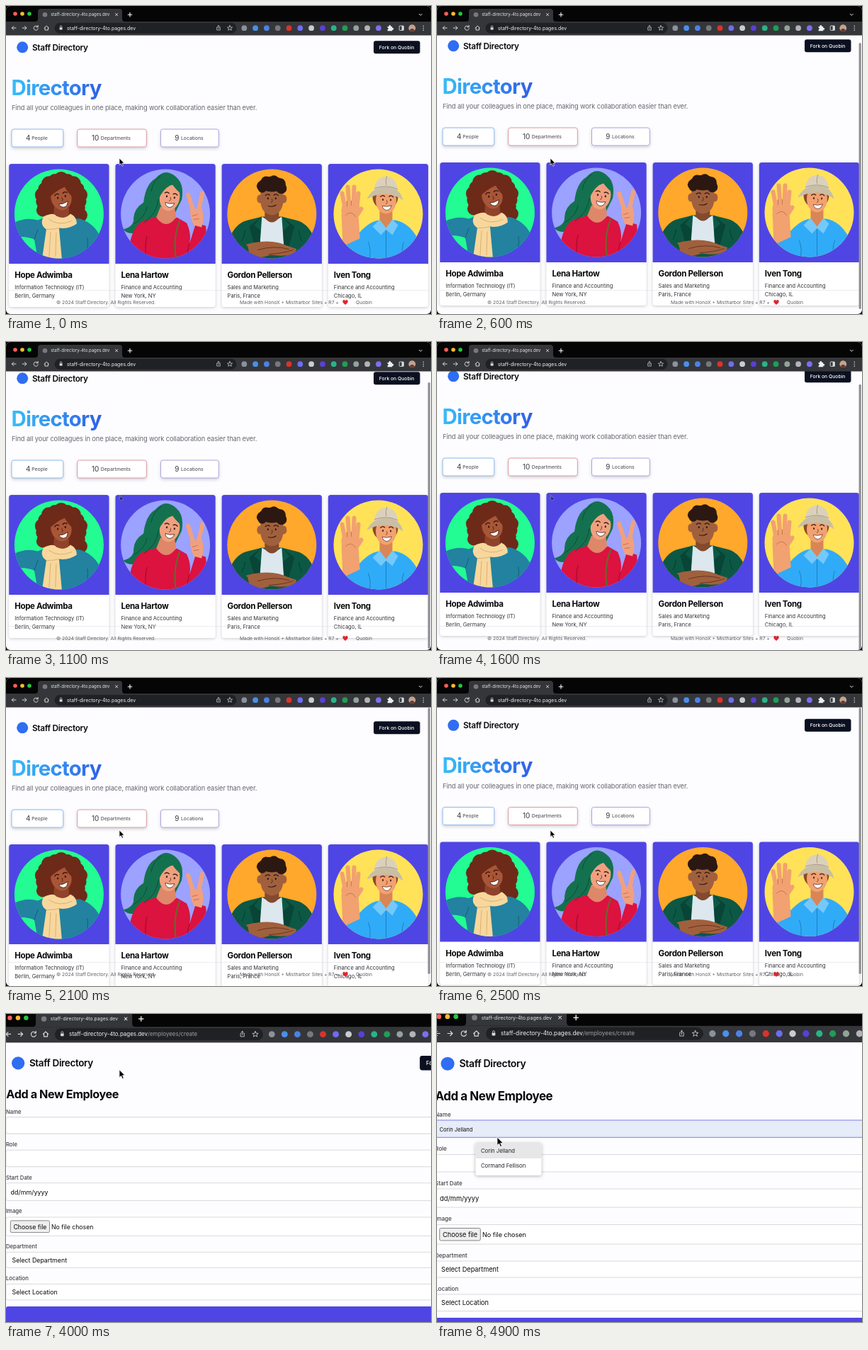
An HTML page that plays this animation: 600x435 px, repeating every 5000 ms.

```html
<!DOCTYPE html>
<html lang="en">
<head>
<meta charset="utf-8">
<title>Staff Directory</title>
<style>
html, body { margin: 0; width: 100%; height: 100%; overflow: hidden; background: #000; }
svg { display: block; width: 100vw; height: 100vh; font-family: Inter, Roboto, sans-serif; }
text { white-space: pre; }
.card { filter: drop-shadow(0 1px 2px rgba(0,0,0,.2)); }
.stat { filter: drop-shadow(0 2px 2px rgba(30,30,60,.2)); }
.menu { filter: drop-shadow(0 1.5px 2.5px rgba(0,0,0,.3)); }
</style>
</head>
<body>
<svg id="stage" viewBox="0 0 600 435" xmlns="http://www.w3.org/2000/svg"></svg>
<script>
const LOOP = 5000, STEP = 100, REST = 231.5;
const ZOOM = { s: .194, x: -12.7, y: -9.5 };
const HOST = 'staff-directory-4to.pages.dev', PATH = '/employees/create';
const PAGE = '#fdfdff', INDIGO = '#4f45e4', BAR = '#35363a';

// Markup helpers
const path = (d, fill, more = '') => `<path d="${d}" fill="${fill}" ${more}/>`;
const line = (d, color, w = 1, more = '') =>
  path(d, 'none', `stroke="${color}" stroke-width="${w}" stroke-linecap="round" stroke-linejoin="round" ${more}`);
const oval = (x, y, rx, ry, fill, turn = 0) =>
  `<ellipse cx="${x}" cy="${y}" rx="${rx}" ry="${ry}" fill="${fill}" transform="rotate(${turn} ${x} ${y})"/>`;
const dot = (x, y, r, fill) => oval(x, y, r, r, fill);
const box = (x, y, w, h, fill, r = 0, more = '') =>
  `<rect x="${x}" y="${y}" width="${w}" height="${h}" rx="${r}" fill="${fill}" ${more}/>`;
const label = (x, y, size, str, fill = '#18181b', weight = 400, track = 0) =>
  `<text x="${x}" y="${y}" font-size="${size}" fill="${fill}" font-weight="${weight}" letter-spacing="${track}">${str}</text>`;
const group = (id, body, more = '') => `<g id="${id}" ${more}>${body}</g>`;

// Portraits, drawn around the centre of a disc of radius 63
const face = (x, y, turn, ink, open = true) => `<g transform="translate(${x} ${y}) rotate(${turn})">` +
  line('M-9 -6Q-6 -9 -3 -6.5M3 -6.5Q6 -9 9 -6', ink, 1.4) +
  line('M-5.5 -2.2v.8M5.5 -2.2v.8', ink, 2.2) +
  line('M0 -1Q2 3 -1 4', ink, .7) +
  (open ? path('M-6 7Q0 9 7 6Q5 13 0 13Q-5 12 -6 7Z', '#fff', `stroke="${ink}" stroke-width=".7"`)
        : line('M-5 9Q1 11 6 7.5', ink, 1.1)) + '</g>';

const curls = (cx, cy, rx, ry, r, n, from, to, fill) => {
  let out = '';
  for (let i = 0; i < n; i++) {
    const a = (from + (to - from) * i / (n - 1)) * Math.PI / 180;
    out += dot((cx + rx * Math.cos(a)).toFixed(1), (cy + ry * Math.sin(a)).toFixed(1), r + i % 2 * 1.5, fill);
  }
  return out;
};

function curlyWoman() {
  const hair = '#6d2a18', skin = '#a85637', knit = '#2282a0';
  return curls(3, -22, 27, 27, 9, 15, 130, 410, hair) + oval(3, -28, 26, 28, hair) +
    dot(30, 2, 10, hair) + dot(-23, -5, 9, hair) +
    path('M-66 14Q-48 4 -30 9L-18 4 30 7Q50 14 58 32L52 64H-30L-35 36Q-50 30 -66 34Z', knit) +
    line('M-35 36Q-32 28 -30 22M37 62Q42 48 40 34', '#14566c', .8) +
    path('M-7 -10L-8 6Q4 14 14 6L14 -8Z', '#8f432b') +
    path('M-22 4Q-8 -3 -4 3Q8 9 16 0Q25 4 25 14Q14 22 0 20L4 64H-24L-18 22Q-28 15 -22 4Z', '#f8d79d') +
    line('M-18 22Q-6 22 0 20M-12 26L-14 60M-4 27L-5 60M-14 8Q0 18 18 10', '#c99f62', .7) +
    oval(3, -23, 14.5, 18, skin, -14) +
    path('M-13 -24Q-12 -42 4 -44Q18 -42 19 -24Q12 -30 8 -38Q-2 -34 -13 -24Z', hair) +
    face(4, -22, -14, '#35130b');
}

function wavingWoman() {
  const hair = '#14714f', skin = '#f0a07f', dark = '#0b4a37';
  return path('M-14 -50Q0 -66 15 -52Q27 -42 23 -20L12 2Q-8 18 -26 20Q-48 34 -60 22Q-44 18 -45 6Q-44 -8 -31 -16Q-28 -42 -14 -50Z', hair) +
    path('M-52 64Q-52 22 -32 10L-9 3Q4 14 16 5L30 13Q37 28 34 42L43 13 57 17Q60 46 50 64Z', '#dc123f') +
    path('M-7 -10L-13 5Q1 24 15 5L13 -10Z', '#df8769') +
    line('M20 10Q10 36 15 63', '#5f6d2b', 2) +
    line('M-27 63Q-30 46 -26 32M34 42Q30 52 32 63', '#8d0c2c', .9) +
    path('M40 16Q34 4 35 -6L51 -8Q56 4 51 19Z', skin) +
    line('M39 -5L32 -27M47 -6L52 -29', skin, 6) + line('M38 3L45 1M40 8L47 7', '#b9654b', .8) +
    oval(6, -23, 14, 19, skin, 12) +
    path('M-10 -20Q-8 -45 10 -46Q22 -44 22 -28Q15 -34 10 -41Q-2 -38 -10 -20Z', hair) +
    line('M-10 -20Q-12 0 -30 12M-20 -32Q-18 -46 -6 -54M-26 -10Q-28 4 -44 14', dark, .9) +
    face(7, -22, 10, '#3d1b1b');
}

function blazerMan() {
  const skin = '#a1603d', green = '#0c5845';
  return path('M-66 56Q-58 14 -34 9L-14 4H14L34 9Q58 14 66 56L44 66H-44Z', green) +
    path('M-14 4L-17 46H17L14 4Q0 14 -14 4Z', '#dce7ee') +
    path('M-10 -10V6Q0 18 10 6V-10Z', '#834a2e') +
    path('M-14 3L-25 16 -16 24 -17 46H-24L-32 18ZM14 3L25 16 16 24 17 46H24L32 18Z', '#084536') +
    path('M-46 46Q-4 32 24 46L42 52Q24 62 -2 58Q-26 66 -44 60Z', skin) +
    line('M-20 51Q4 44 24 50M-4 57Q16 56 30 51', '#5d321f', .9) +
    path('M-64 38Q-44 34 -34 46L-30 64H-64ZM64 38Q44 34 36 46L30 64H64Z', green) +
    line('M-42 38Q-38 30 -38 24M42 38Q38 30 38 24', '#063a2d', .9) +
    oval(-17, -21, 4, 6, skin) + oval(17, -21, 4, 6, skin) +
    path('M-16 -36H16V-16Q14 0 0 2Q-14 0 -16 -16Z', skin) +
    curls(0, -38, 14, 9, 6, 10, 165, 375, '#2c1812') + oval(0, -40, 16, 9, '#2c1812') +
    face(0, -20, 0, '#2c1812', false);
}

function hatMan() {
  const skin = '#f2a171', hat = '#dbd1bb', blue = '#30abf7';
  return oval(10, -24, 18, 18, '#8b4a27') +
    path('M-48 64L-28 28Q-12 10 2 9H24Q44 13 55 34L46 66Z', blue) +
    path('M2 -6V12L11 24 20 12V-6Z', '#d98555') +
    path('M2 8L-8 18 4 30 11 22 20 30 28 16 20 8 11 20Z', '#74c9fb') +
    line('M11 24V63M-14 40Q-10 50 -12 62M36 40Q32 50 35 63', '#1775b5', .8) +
    path('M-52 0L-49 66H-24L-28 2Z', skin) + path('M-50 46L-20 32 -16 66H-52Z', blue) +
    oval(-39, -5, 13, 14, skin) +
    line('M-47 -8L-51 -29M-41 -10L-43 -38M-35 -10L-34 -38M-30 -8L-28 -29M-30 2L-24 -7', skin, 6) +
    line('M-46 2Q-38 -6 -32 4M-44 -11V-18M-38 -12V-18', '#bd6c43', .8) +
    oval(11, -19, 14.5, 19, skin) +
    path('M-6 -32Q-5 -52 12 -53Q27 -51 28 -31Z', hat) +
    path('M-16 -21Q-8 -38 12 -38Q31 -37 35 -19Q12 -36 -16 -21Z', '#c9bea6') +
    line('M-5 -36Q12 -42 27 -35M12 -53Q10 -47 11 -41', '#978c76', .8) +
    face(12, -18, 2, '#552a1a');
}

const staff = [
  [4.2, 'Hope Adwimba', 'Information Technology (IT)', 'Berlin, Germany', '#22fc92', curlyWoman],
  [154.4, 'Lena Hartow', 'Finance and Accounting', 'New York, NY', '#9ba2ff', wavingWoman],
  [304.6, 'Gordon Pellerson', 'Sales and Marketing', 'Paris, France', '#ffa82b', blazerMan],
  [454.8, 'Iven Tong', 'Finance and Accounting', 'Chicago, IL', '#ffe258', hatMan]
];

const card = ([x, name, team, city, disc, portrait]) =>
  `<g transform="translate(${x} ${REST})">` +
  box(0, 0, 141.3, 202, '#fff', 3.5, 'class="card"') +
  path('M0 141V3.5Q0 0 3.5 0H137.8Q141.3 0 141.3 3.5V141Z', INDIGO) +
  `<g transform="translate(70.7 70.5)">${dot(0, 0, 63, disc)}<g clip-path="url(#disc)">${portrait()}</g></g>` +
  label(8, 161.3, 11.5, name, '#09090b', 700, -.35) +
  label(8, 177.3, 7.5, team, '#333338') + label(8, 189.3, 7.5, city, '#333338') + '</g>';

const stat = (x, w, color, n, nx, word, wx) =>
  box(x, 182.5, w, 25, '#fff', 3, `class="stat" stroke="${color}"`) +
  label(nx, 198.4, 9.8, n, '#52525b', 500) + label(wx, 197.4, 6.8, word, '#5b5b64', 500);

const header = () => dot(23.2, 66.8, 8, '#2f6df2') +
  label(37, 71, 11.8, 'Staff Directory', '#09090b', 600, -.3) +
  box(519, 57.7, 65.5, 18, '#0b1020', 3) + label(526.8, 69.4, 6.8, 'Fork on Quobin', '#fff', 500);

const home = () => label(7.5, 134, 29.3, 'Directory', 'url(#sky)', 700, -.7) +
  label(8, 155.7, 9.3, 'Find all your colleagues in one place, making work collaboration easier than ever.', '#66666e', 400, -.12) +
  stat(8, 72.8, '#8cbbea', 4, 28, 'People', 36.3) +
  stat(100.7, 97.6, '#df9a9f', 10, 121, 'Departments', 133.8) +
  stat(218.5, 81.8, '#aea4e2', 9, 238.3, 'Locations', 247) +
  staff.map(card).join('');

const field = (name, base, top, h, body) =>
  label(-3, base, 8.1, name, '#3f3f46', 500) +
  box(-3, top, 697, h, '#fff', 3, 'stroke="#d9d9df"') + body;

// Laid out at the enlarged scale, then mapped back to the page
const form = () => label(-2.5, 122, 16.9, 'Add a New Employee', '#09090b', 700, -.42) +
  field('Name', 144.7, 150, 24.3, box(-3, 150, 697, 24.3, '#fff', 3, 'id="name" stroke="#d9d9df"') +
    group('preview', label(3.5, 165.6, 7.5, 'Corin Jelland', '#09090b'))) +
  field('Role', 193, 198.5, 24.5, '') +
  field('Start Date', 241.7, 247, 26, label(4, 263.7, 9.3, 'dd/mm/yyyy', '#09090b')) +
  field('Image', 291.5, 297.5, 27.5, box(3.7, 302.5, 57.6, 17.5, '#efefef', 2, 'stroke="#767676" stroke-width=".9"') +
    label(8, 314.7, 9.2, 'Choose file', '#09090b') + label(64, 314.7, 9.1, 'No file chosen', '#09090b')) +
  field('Department', 343.7, 349, 23, label(6, 364, 9.2, 'Select Department', '#09090b')) +
  field('Location', 390.5, 396, 23.5, label(6, 411, 9.2, 'Select Location', '#09090b')) +
  box(-3, 429, 697, 31, INDIGO, 3) +
  group('menu', box(54.5, 182, 93, 46, '#fff', 2.5, 'class="menu"') +
    box(54.5, 182, 93, 22, '#e7e7e9', 2, 'id="hot"') +
    label(62, 195.8, 7.7, 'Corin Jelland', '#222226') + label(62, 217.2, 7.7, 'Cormand Fellison', '#222226'));

const footer = () => line('M4 401.5H596', '#d4d4dc', .7, 'opacity=".6"') +
  label(71, 420.7, 6.75, '© 2024 Staff Directory. All Rights Reserved.', '#5f5f68') +
  label(330, 420.7, 6.75, 'Made with HonoX + Mistharbor Sites + R7 +', '#5f5f68') +
  path('M479 422Q475 418.8 475.3 417Q475.5 415 477.3 415.1Q478.6 415.3 479 416.6Q479.4 415.3 480.7 415.1Q482.5 415 482.7 417Q483 418.8 479 422Z', '#e0242e') +
  label(494, 420.7, 6.75, 'Quobin', '#5f5f68');

function chrome() {
  const badges = ['#8b9299', '#4a90e8', '#4b82e6', '#77787c', '#d8342b', '#6f6cf0', '#c9cbcf',
    '#5a3fd6', '#28b485', '#1f9d55', '#93a39a', '#b2b4b8', '#7b70ee'];
  const ink = '#d7d9dd';
  return box(0, 0, 600, 23, '#050506') + box(0, 22, 600, 19.5, BAR) +
    ['#ff5f57', '#febc2e', '#28c840'].map((c, i) => dot(13 + 10 * i, 11, 2.8, c)).join('') +
    path('M41 22Q45 22 45 18V8Q45 4 49 4H160Q164 4 164 8V18Q164 22 168 22Z', BAR) +
    dot(55, 12.2, 3.3, '#77797f') + label(63.2, 14.4, 5.95, HOST, '#e4e5e8') +
    line('M154.5 10.5l3.2 3.2m0 -3.2l-3.2 3.2', ink, .9) + line('M172.2 12.2h5.6M175 9.4v5.6', '#fff', 1.1) +
    line('M583.3 11.3l2 2 2 -2', ink, 1) +
    line('M14 31H8.3m2.5 -2.5L8.3 31l2.5 2.5M23.2 31h5.7m-2.5 -2.5l2.5 2.5 -2.5 2.5', ink, 1) +
    line('M44.8 29.3A3.1 3.1 0 1 0 45.3 32M45.2 27.5V29.8H42.9', ink, 1) +
    line('M54 31l3.2 -3 3.2 3M55 30.5V34h4.4V30.5', ink, 1) +
    box(68.5, 23.7, 257, 15, '#202124', 7.5, 'id="omni"') +
    box(75.6, 30.2, 4, 3.3, ink, .6) + line('M76.4 30v-1a1.2 1.2 0 0 1 2.4 0v1', ink, .7) +
    box(85.5, 26.3, 99, 9.8, '#a9cdfb', 0, 'id="select"') +
    `<text x="86" y="33.5" font-size="6.95"><tspan id="host">${HOST}</tspan><tspan id="tail" fill="#9aa0a6"></tspan></text>` +
    line('M298.6 30H297.7V34H302.3V30H301.4M300 32V27.5M298.7 28.7L300 27.5 301.3 28.7', ink, .7) +
    line('M316 27.5l1 2.4 2.6.2 -2 1.6.7 2.5 -2.3 -1.4 -2.3 1.4.7 -2.5 -2 -1.6 2.6 -.2Z', ink, .7) +
    badges.map((c, i) => dot(336.3 + 15.8 * i, 31.2, 3.9, c)).join('') +
    path('M538.6 29h2a1.4 1.4 0 1 1 2.6 0h2v2a1.4 1.4 0 1 1 0 2.6v1.6h-6.6v-2a1.2 1.2 0 0 0 0 -2.4Z', '#eceef0') +
    box(555.2, 28, 6.2, 6.4, 'none', .8, `stroke="${ink}" stroke-width=".9"`) + box(558.6, 28, 2.8, 6.4, ink) +
    dot(573.3, 31.2, 4.9, '#c7a18c') + path('M569.6 34.3Q573.3 29.5 577 34.3Q573.3 37.8 569.6 34.3Z', '#5b3a35') +
    [28.3, 31.2, 34.1].map(y => dot(589.3, y, .8, ink)).join('');
}

const cursors = () =>
  path('M0 0V9.6L2.2 7.6 3.8 11.2 5.5 10.4 3.9 7H7Z', '#000', 'id="arrow" stroke="#fff" stroke-width=".7"') +
  group('beam', line('M-1.8 -4.3Q0 -4.3 0 -3V3Q0 4.3 -1.8 4.3M1.8 -4.3Q0 -4.3 0 -3M0 3Q0 4.3 1.8 4.3', '#fff', 1.8) +
    line('M-1.8 -4.3Q0 -4.3 0 -3V3Q0 4.3 -1.8 4.3M1.8 -4.3Q0 -4.3 0 -3M0 3Q0 4.3 1.8 4.3', '#333', .8)) +
  path('M0 1.5Q.8 .6 1.4 1.6L2 4 4.6 4.6Q5.2 5 5 6.2L4.4 8.6H1.6L-.6 5.8Q0 5 .8 5.6Z', '#2a2748',
    'id="hand" stroke="#b9b6ee" stroke-width=".5" opacity=".8"');

const stage = document.getElementById('stage');
stage.innerHTML = `<defs>
  <clipPath id="disc"><circle r="63"/></clipPath>
  <clipPath id="frame"><rect width="600" height="435" rx="6"/></clipPath>
  <linearGradient id="sky"><stop stop-color="#38bdf8"/><stop offset="1" stop-color="#2f5fe8"/></linearGradient>
  </defs>` + group('win',
    box(0, 0, 600, 435, PAGE) +
    group('page', header() + group('home', home()) +
      group('form', form(), `transform="scale(${1 / (1 + ZOOM.s)}) translate(${-ZOOM.x} ${-ZOOM.y})"`)) +
    footer() + box(595.6, 0, 3.2, 376, '#8f8f94', 1.6, 'id="thumb"') + chrome() + group('mouse', cursors()),
    'clip-path="url(#frame)"');

const ui = {};
stage.querySelectorAll('[id]').forEach(el => ui[el.id] = el);
const show = (id, on) => ui[id].setAttribute('display', on ? 'inline' : 'none');
const set = (id, key, value) => ui[id].setAttribute(key, value);

const clamp = v => Math.max(0, Math.min(1, v));
const ease = v => (v = clamp(v), v * v * (3 - 2 * v));
const mix = (a, b, k) => a + (b - a) * k;

// Keys are [time, ...values]; each span is eased
function track(keys, t) {
  const i = keys.findIndex(k => k[0] > t);
  if (i < 0) return keys[keys.length - 1].slice(1);
  const a = keys[i - 1], b = keys[i], k = ease((t - a[0]) / (b[0] - a[0]));
  return a.slice(1).map((v, j) => mix(v, b[j + 1], k));
}

const scrollKeys = [[0, 223], [600, 221], [1100, 216], [1600, 213], [1800, 213], [2100, 235], [2500, REST]];
const mouseKeys = [[0, 160, 215], [2500, 160, 215], [3000, 184, 38], [3800, 184, 38],
  [4300, 82, 143], [4700, 82, 145], [4900, 81.8, 153.7]];

function draw(t) {
  const [top] = track(scrollKeys, t), dy = top - REST;
  const [mx, my] = track(mouseKeys, t);
  const z = ease((t - 3600) / 600), onForm = t >= 3900;
  set('win', 'transform', `translate(${ZOOM.x * z} ${ZOOM.y * z}) scale(${1 + ZOOM.s * z})`);
  set('page', 'transform', `translate(0 ${dy})`);
  show('home', !onForm);
  show('form', onForm);

  show('thumb', t >= 100 && t < 2700);
  set('thumb', 'y', 42 + Math.max(0, -dy) * .96);

  const editing = t >= 3100 && !onForm, selected = editing && t < 3400;
  set('omni', 'stroke', editing ? '#5f97f6' : 'none');
  set('omni', 'stroke-width', 1.4);
  show('select', selected);
  set('host', 'fill', selected ? '#1c2b45' : '#f1f3f4');
  ui.tail.textContent = PATH.slice(0, Math.round(PATH.length * clamp((t - 3400) / 400)));

  const focused = t >= 4400, hovered = t >= 4900;
  set('name', 'stroke', focused ? '#8583ef' : '#d9d9df');
  set('name', 'fill', hovered ? '#e6ecf8' : '#fff');
  show('preview', hovered);
  show('menu', t >= 4600);
  show('hot', hovered);

  const beam = onForm ? my > 133 && my < 153 : my < 41;
  const hand = !onForm && !beam && my > top - 3.5 && t < 2000;
  set('mouse', 'transform', `translate(${mx} ${my})`);
  show('beam', beam);
  show('hand', hand);
  show('arrow', !beam && !hand);
}

function tick() {
  const t = performance.now() % LOOP;
  draw(Math.floor(t / STEP) * STEP);
  requestAnimationFrame(tick);
}
tick();
</script>
</body>
</html>
```
